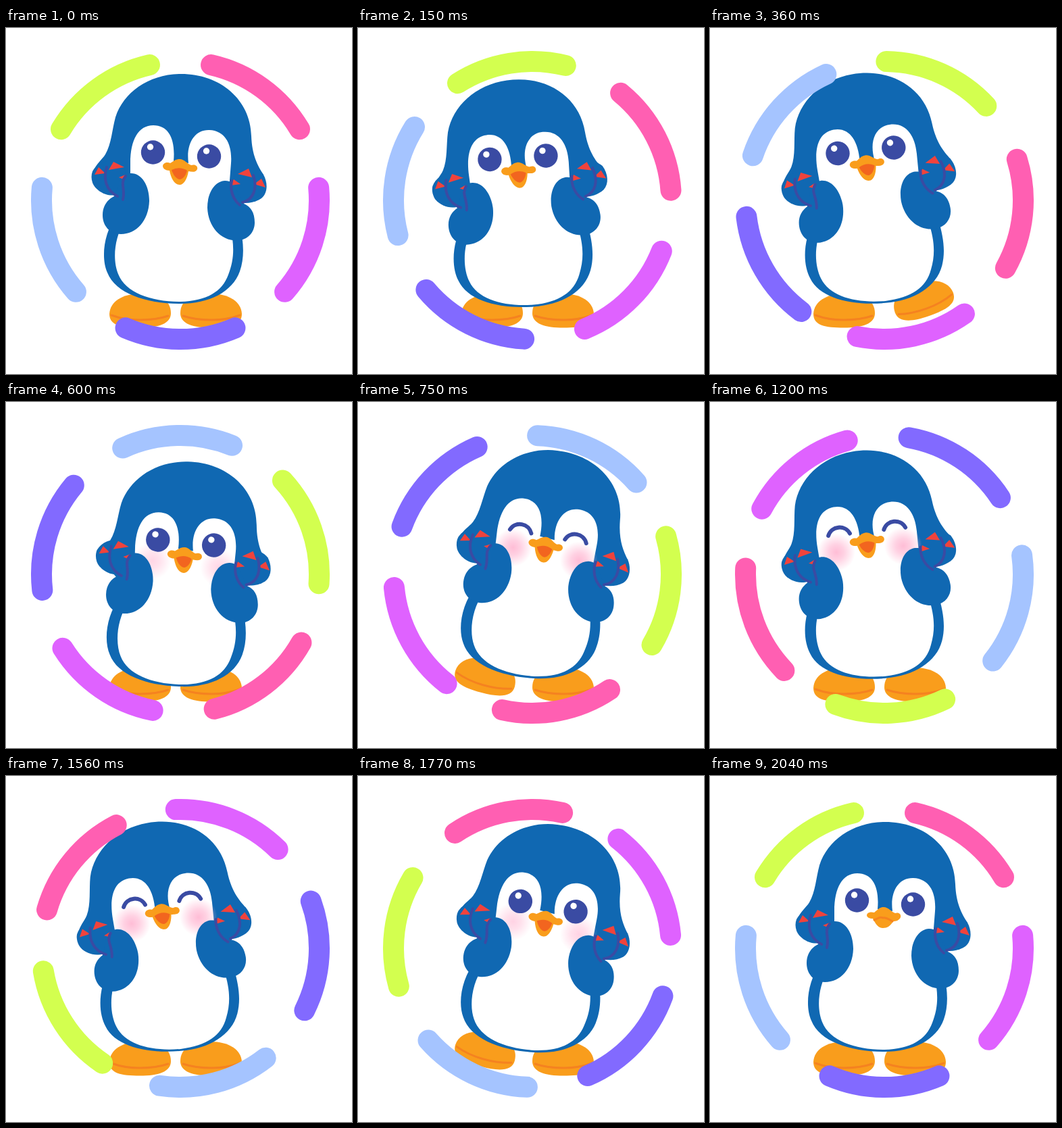
Animation of 512x512 px, one loop 2.07 s. Source, as an HTML page:

```html
<!DOCTYPE html>
<html lang="en">
<head>
<meta charset="utf-8">
<title>Dancing penguin</title>
<style>
  html, body { margin: 0; width: 100%; height: 100%; overflow: hidden; background: #fff; }
  svg { display: block; width: 100vw; height: 100vh; }
  .blue { fill: #1068b2; }
  .white { fill: #fff; }
  .orange { fill: #f99d1c; }
  .line { fill: none; stroke-linecap: round; stroke-linejoin: round; }
  .crease { stroke: #f58220; stroke-width: 3; }
  .ink { stroke: #3a4ba3; stroke-width: 4; }
  .smile { stroke: #3a4ba3; stroke-width: 6; }
  .pupil { fill: #3a4ba3; }
  .claw { fill: #f0433c; }
  #ring circle { fill: none; stroke-width: 31; stroke-linecap: round; stroke-dasharray: 46.4 313.6; }
</style>
</head>
<body>
<svg viewBox="0 0 512 512">
  <defs>
    <radialGradient id="pink">
      <stop offset="0" stop-color="#ffbdd6"/>
      <stop offset=".4" stop-color="#ffbdd6" stop-opacity=".7"/>
      <stop offset="1" stop-color="#ffbdd6" stop-opacity="0"/>
    </radialGradient>
    <g id="foot">
      <path class="orange" d="M153 423C154 405 172 393 200 393C226 393 244 402 244 422C244 438 225 443.500 198 443.500C170 443.500 153 440 153 423Z"/>
      <path class="line crease" d="M156 425Q175 432 198 432Q222 432 240 426"/>
    </g>
    <g id="openEye">
      <circle class="pupil" r="17.7"/>
      <circle class="white" cx="-4" cy="-8" r="4.700"/>
    </g>
    <path id="happyEye" class="line smile" d="M-16 7C-10 -7 10 -7 16 7"/>
  </defs>

  <g id="leftFoot"><use href="#foot"/></g>
  <g id="rightFoot"><use href="#foot" transform="matrix(-1 0 0 1 502 0)"/></g>

  <g class="torso">
    <path class="blue" d="M165 275C143 305 141 342 150 362C162 393 208 408 258 408C300 408 335 391 346 360C353 340 352 318 346 290L335 270Z"/>
  </g>
  <g class="head">
    <path class="blue" d="M259 68C317 68 362 106 363 160C364 188 372 203 381 217L345 255L335 300L170 290L165 250L130 211C134 200 142 195 147 187C156 172 157 150 162 132C174 95 212 68 259 68Z"/>
  </g>
  <g class="torso">
    <path class="white" d="M176 285C159 312 158 345 166 364C177 392 215 405 258 405C297 404 320 390 329 365C338 342 338 322 332 295L315 262L195 255Z"/>
  </g>
  <g class="head">
    <path class="white" d="M184 200C184 165 196 144 218 144C241 144 251 165 248 197L270 200C266 170 280 150 301 151C325 152 335 173 333 200L330 238L318 320L182 315L184 230Z"/>
  </g>
  <g id="face">
    <g id="blush" fill="url(#pink)">
      <circle cx="210" cy="215" r="28"/>
      <circle cx="309" cy="223" r="28"/>
    </g>
    <g id="eyesOpen">
      <use href="#openEye" x="217.500" y="184"/>
      <use href="#openEye" x="300.500" y="190"/>
    </g>
    <g id="eyesHappy">
      <use href="#happyEye" transform="translate(219 183) rotate(4)"/>
      <use href="#happyEye" transform="translate(301.500 188.500) rotate(4)"/>
    </g>
    <g id="beakOpen">
      <path class="orange" d="M257 194C264 194 268 201 274 203C281 201 284 205 283 209C281 214 275 213 270 212C268 224 263 232 257 232C249 232 244 222 242 211C236 211 232 208 232 204C233 199 239 198 243 200C248 197 251 194 257 194Z"/>
      <path fill="#f2651f" d="M245 210Q257 204 268 211C266 219 261 224 257 224C251 223 247 216 245 210Z"/>
    </g>
    <g id="beakClosed">
      <path class="orange" d="M257 194C264 194 268 201 274 203C280 201 283 205 282 209C280 214 275 215 271 215C267 222 262 225 256 225C249 225 245 219 241 211C236 211 232 209 232 206C233 201 239 201 243 202C248 198 251 194 257 194Z"/>
      <path class="line crease" d="M243 213C250 210 252 208 256 210C261 209 264 212 270 215"/>
    </g>
  </g>
  <g id="arms">
    <path class="blue" d="M128 212C136 196 160 190 175 205L178 225L162 247C148 250 132 240 128 229C126 223 126 217 128 212Z"/>
    <path class="blue" d="M381 217C388 230 387 245 378 252C368 259 355 260 345 258L334 228C345 203 365 200 381 217Z"/>
    <path class="blue" d="M185 215C201 215 212 233 212 256C211 285 193 305 170 305C153 305 143 292 143 277C143 263 150 254 160 249C165 240 168 225 172 218C176 215 180 215 185 215Z"/>
    <path class="blue" d="M324 226C308 227 298 245 298 266C299 294 318 315 342 314.500C358 314 368 302 368 288C368 273 362 264 352 260C345 250 340 235 336 230C333 227 328 226 324 226Z"/>
    <path class="claw" d="M131 217L137 206L147 215ZM152 210L159 198L175 206ZM167 221L177 217L174 224ZM343 216L359 208L364 221ZM367 231L378 223L384 236ZM332 233L337 224L347 231Z"/>
    <path class="line ink" d="M149 206C144 222 147 240 165 249M177 219C168 230 177 238 173 254M334 226C331 240 336 254 346 262M366 218C372 236 367 254 350 258"/>
  </g>
  <g id="ring"></g>
</svg>
<script>
  const LOOP = 2070, TICK = 30, STEPS = 54, DANCE = 27;
  const COLORS = ['#df62ff', '#826aff', '#a5c4ff', '#d3ff4f', '#ff5fb2'];

  // One dance cycle: step, lean in degrees, shift x, shift y
  const POSES = [
    [0, 0, 0, 0], [2.5, -4, 1, 18], [5, -10, 2, 3], [9, -10, 2, -2],
    [14, -10, 1, -1], [16, 1.4, 3, 20], [19, 6.5, 3, 1], [25, 5.8, 3, -2], [27, 0, 0, 0]
  ];

  const $ = id => document.getElementById(id);
  const heads = document.querySelectorAll('.head');
  const torsos = document.querySelectorAll('.torso');
  const clamp = v => Math.max(0, Math.min(1, v));
  const move = (el, value) => el.setAttribute('transform', value);
  const show = (id, on) => $(id).setAttribute('visibility', on ? 'visible' : 'hidden');

  $('ring').innerHTML = COLORS.map((color, i) =>
    `<circle cx="258" cy="255" r="205.5" pathLength="360" stroke="${color}"
      transform="rotate(${18 + 72 * i - 23.2} 258 255)"/>`).join('');

  // Every fourth step is held for two ticks
  function stepAt(ms) {
    const tick = Math.floor(ms / TICK);
    return 4 * Math.floor(tick / 5) + Math.max(0, tick % 5 - 1);
  }

  function poseAt(phase) {
    const i = POSES.findIndex(p => p[0] > phase);
    const a = POSES[i - 1], b = POSES[i];
    const k = (1 - Math.cos(Math.PI * (phase - a[0]) / (b[0] - a[0]))) / 2;
    return a.map((v, j) => v + (b[j] - v) * k).slice(1);
  }

  // Foot tap between two phases, 0 to 1
  const tap = (phase, from, to) => Math.sin(Math.PI * clamp((phase - from) / (to - from)));

  function draw(step) {
    const phase = step % DANCE;
    const [lean, x, y] = poseAt(phase);
    const dip = Math.max(0, y);
    const tilt = (pivot, dy) => `translate(${x} ${dy}) rotate(${lean} ${pivot} 360)`;

    // The features turn around a point further left, so they slide over the head
    heads.forEach(el => move(el, tilt(248, y)));
    move($('face'), tilt(222, y));
    move($('arms'), tilt(248, y - dip * 0.5));
    torsos.forEach(el => move(el,
      `translate(${x + lean * 0.6} ${dip * 0.65}) rotate(${lean / 2} 248 340)`));

    const right = tap(phase, 5, 14), left = tap(phase, 18, 25);
    move($('rightFoot'), `translate(${12 * right} ${-16 * right}) rotate(${-20 * right} 303 418)`);
    move($('leftFoot'), `translate(${-12 * left} ${-16 * left}) rotate(${20 * left} 199 418)`);

    const happy = step >= 19 && step < 47;
    const shut = step > 21 && step < 29 || step > 48;
    show('eyesHappy', happy);
    show('eyesOpen', !happy);
    show('beakClosed', shut);
    show('beakOpen', !shut);
    $('blush').setAttribute('opacity', Math.min(clamp((step - 11) / 8), clamp((51 - step) / 6)));
    move($('ring'), `rotate(${step * 360 / STEPS} 258 255)`);
  }

  const start = performance.now();
  function frame() {
    draw(stepAt((performance.now() - start) % LOOP));
    requestAnimationFrame(frame);
  }
  frame();
</script>
</body>
</html>
```
